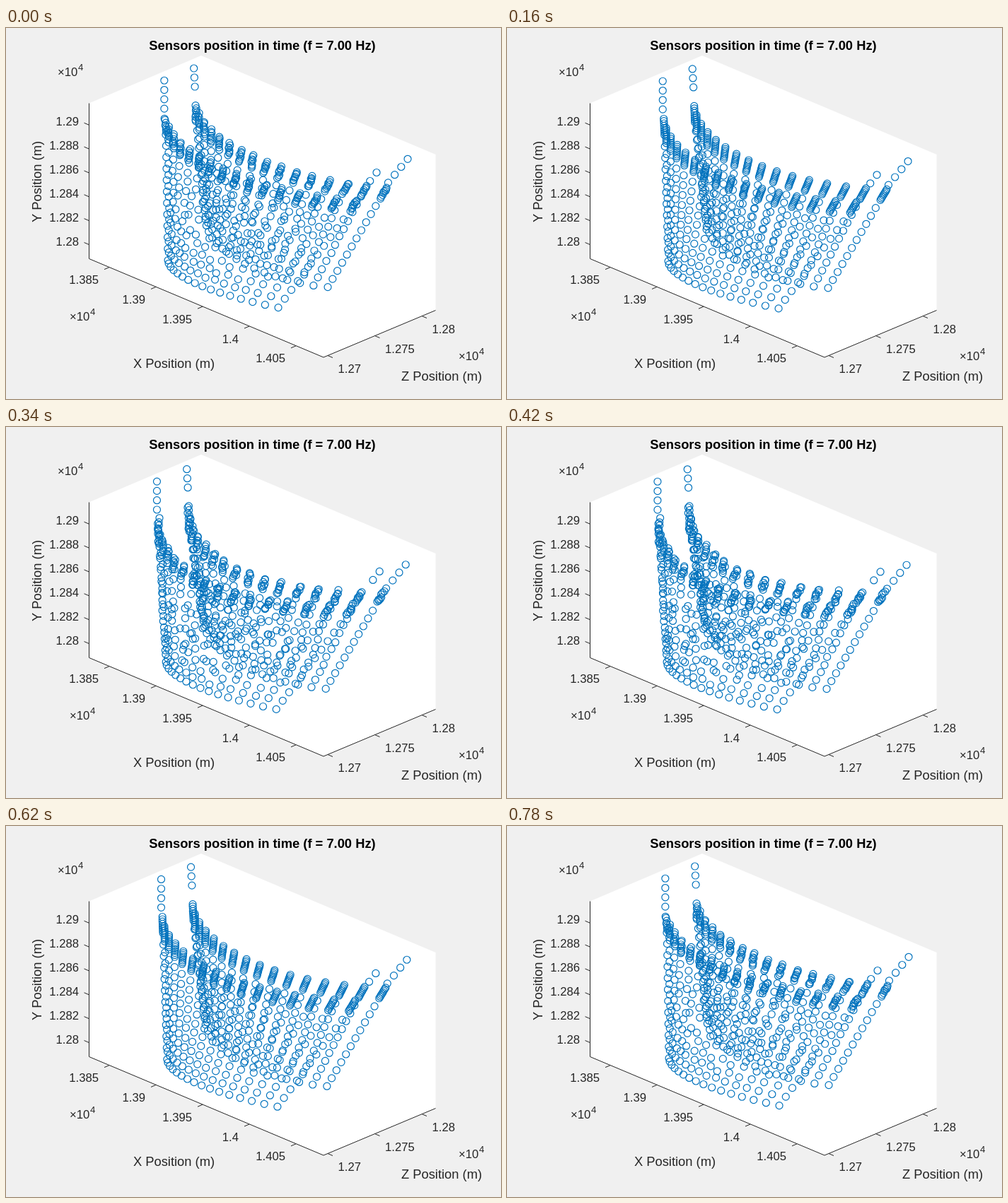
Animation of 700 by 525 pixels, one loop 0.8 s. Source, as an HTML page with a canvas:

```html
<!DOCTYPE html>
<html>
<head>
<meta charset="utf-8">
<style>
html, body { margin: 0; height: 100%; overflow: hidden; background: #f0f0f0; }
canvas { display: block; }
</style>
</head>
<body>
<canvas id="stage" width="700" height="525"></canvas>
<script>
const ctx = document.getElementById('stage').getContext('2d');
const FONT = '"Liberation Sans", Arial, sans-serif';
const INK = '#262626', BLUE = '#0072bd';
const COLUMNS = 16, DENSE = 8, SPARSE = 11;
const DEPTH = [43, -18];
const REF = 0.3; // wave value at which the columns are smooth

const mix = (a, b, u) => [a[0] + (b[0] - a[0]) * u, a[1] + (b[1] - a[1]) * u];
const add = (a, b, k = 1) => [a[0] + b[0] * k, a[1] + b[1] * k];

// Bowl edge: x speeds up by power p while y levels off by power q
const curve = (a, b, u, p, q) =>
  [a[0] + (b[0] - a[0]) * u ** p, b[1] + (a[1] - b[1]) * (1 - u) ** q];

const rim = u => curve([222, 140], [489.5, 254], u, 1.68, 1.65);
const nearFloor = u => curve([228, 330], [384, 397], u, 1.85, 1.05);
const farFloor = u => curve([281, 272], [454, 368], u, 1.8, 1.4);

// Swing of a column, largest in the middle of the rim
function swing(u) {
  const bulge = Math.sin(Math.PI * u);
  return [5.3 - 3 * u + 9 * bulge, -1.5 - 3 * u - 6.5 * bulge];
}

let seed = 7;
const random = () => (seed = seed * 16807 % 2147483647) / 2147483647 - 0.5;
const scatter = (v, size) => add(v, [random(), random()], size);

// Each sensor is a mean position plus a swing vector
const sensors = [];
const put = (pos, amp, hops) => sensors.push({ pos: add(pos, amp, -REF), amp, hops });

function column(u, far) {
  const amp = swing(u), mid = add(rim(u), DEPTH, far);
  const half = [0.5 - 5 * u, 7.5 + 4 * (1 - u) ** 3];
  for (let j = 0; j < DENSE; j++) {
    put(add(mid, half, j * 2 / (DENSE - 1) - 1), scatter(amp, 3));
  }
  const start = add(mid, half), end = far ? farFloor(u) : nearFloor(u);
  for (let j = 1; j <= SPARSE; j++) {
    const v = j / SPARSE;
    const loose = 14 * Math.sin(Math.PI * v) * Math.sin(Math.PI * u);
    put(mix(start, end, v), scatter(mix(amp, [1.5, -2], v), loose));
  }
}

function arm(count, from, step, amp, hops) {
  for (let i = 0; i < count; i++) put(add(from, step, i), amp, hops);
}

for (const far of [0, 1]) {
  for (let i = 0; i < COLUMNS; i++) column(i / (COLUMNS - 1), far);
}
arm(4, [220, 75.3], [0, 13.3], [5.5, -1.5]);
arm(3, [262, 58], [0.7, 13], [5.3, -1.4]);
arm(4, [567, 188.8], [-9.2, 11.2], [1.5, -5]);
arm(2, [523, 208], [-9.3, 12], [1.5, -5], true);

function line(points) {
  ctx.beginPath();
  points.forEach(p => ctx.lineTo(...p));
}

function text(s, x, y, align = 'center', size = 16.67, weight = '') {
  ctx.font = `${weight} ${size}px ${FONT}`;
  ctx.textAlign = align;
  ctx.fillText(s, x, y);
}

// Ticks and labels of one axis, evenly spaced
function scale(count, from, step, value, delta, dir, offset, align) {
  for (let i = 0; i < count; i++) {
    const p = add(from, step, i);
    line([p, add(p, dir)]);
    ctx.stroke();
    text(+(value + delta * i).toFixed(3), ...add(p, offset), align);
  }
}

function exponent(x, y) {
  text('×10', x, y, 'left');
  text('4', x + 29, y - 8, 'left', 13.3);
}

function drawAxes() {
  ctx.fillStyle = '#f0f0f0';
  ctx.fillRect(0, 0, 700, 525);
  ctx.fillStyle = '#fff';
  const edge = [[117.5, 106.5], [117.5, 326.5], [449, 466], [607.5, 399.5]];
  line([[276, 39], ...edge, [607.5, 179]]);
  ctx.fill();

  ctx.strokeStyle = INK;
  ctx.lineWidth = 1;
  line(edge);
  ctx.stroke();

  ctx.fillStyle = INK;
  scale(6, [117.5, 137.3], [0, 33.85], 1.29, -0.002, [-7, -3], [-14.5, 1], 'right');
  scale(5, [146, 338.6], [66, 27.8], 1.385, 0.005, [-7, 3], [-15, 23.5], 'right');
  scale(3, [455, 463.5], [66.5, -28], 1.27, 0.005, [7, 3], [14.5, 24.5], 'left');
  exponent(73, 68);
  exponent(90, 414);
  exponent(640, 470);

  text('X Position (m)', 237.5, 481, 'center', 18.33);
  text('Z Position (m)', 616, 499, 'center', 18.33);
  ctx.save();
  ctx.translate(50, 217.5);
  ctx.rotate(-Math.PI / 2);
  text('Y Position (m)', 0, 0, 'center', 18.33);
  ctx.restore();
  ctx.fillStyle = '#000';
  text('Sensors position in time (f = 7.00 Hz)', 362.5, 31, 'center', 18.33, 'bold');
}

function frame() {
  const step = Math.floor(performance.now() % 800 / 20);
  const wave = Math.cos(2 * Math.PI * step / 39 - 0.07);
  drawAxes();
  ctx.strokeStyle = BLUE;
  ctx.lineWidth = 1.2;
  for (const { pos, amp, hops } of sensors) {
    let p = add(pos, amp, wave);
    if (hops && wave < -0.56) p = add(p, [7, -9.5]);
    ctx.beginPath();
    ctx.arc(...p, 5, 0, 2 * Math.PI);
    ctx.stroke();
  }
  requestAnimationFrame(frame);
}
frame();
</script>
</body>
</html>
```
